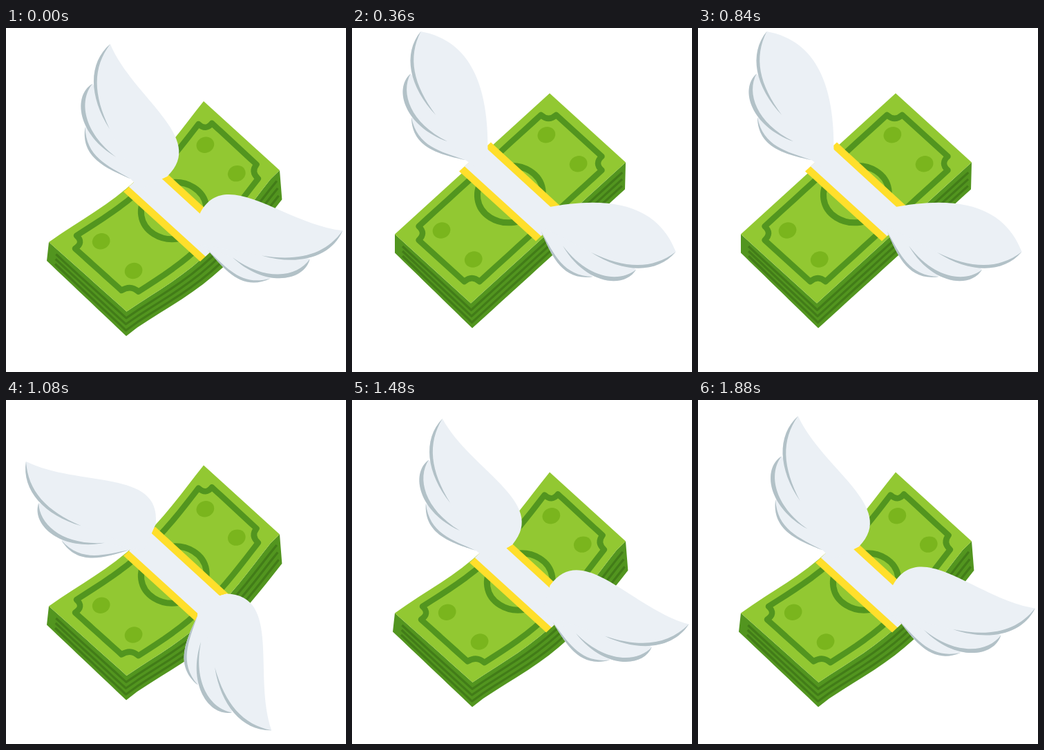
An HTML page with a canvas that plays this animation: 492x498 px, repeating every 1.92 s.

```html
<!DOCTYPE html>
<html lang="en">
<head>
<meta charset="utf-8">
<title>Flying money</title>
<style>
  html, body { margin: 0; width: 100%; height: 100%; overflow: hidden; background: #fff; }
  canvas { display: block; }
</style>
</head>
<body>
<canvas id="stage" width="492" height="498"></canvas>
<script>
const ctx = document.getElementById('stage').getContext('2d');
const LOOP = 1920, FLAP = 480, STEP = 40;
const GREEN = '#92c832', DARK = '#52951f', LINE = '#427c18', SPOT = '#7ab51d';
const WHITE = '#ebf0f5', SHADE = '#b2c1c7', YELLOW = '#ffdf2b';
const LEFT = [62, 298], LONG = [224, -204], SHORT = [110, 100];
const { sin, cos, PI, max } = Math;

const lerp = (a, b, k) => a.map((v, i) => v + (b[i] - v) * k);
const start = p => { ctx.beginPath(); ctx.moveTo(...p); };
const line = p => ctx.lineTo(...p);
const cubic = (a, b, p) => ctx.bezierCurveTo(...a, ...b, ...p);
const fill = color => { ctx.closePath(); ctx.fillStyle = color; ctx.fill(); };
function stroke(color, width) {
  ctx.strokeStyle = color;
  ctx.lineWidth = width;
  ctx.lineJoin = 'round';
  ctx.stroke();
}
function poly(color, ...pts) {
  start(pts[0]);
  pts.slice(1).forEach(line);
  fill(color);
}

// Place on the flat top face: u runs along the long side, v along the short one.
const face = (u, v) => LEFT.map((p, i) => p + LONG[i] * u + SHORT[i] * v);

function drawBill(bend) {
  // The sag is strongest halfway along the long side.
  function sag([x, y]) {
    const t = ((x - LEFT[0]) * LONG[0] + (y - LEFT[1]) * LONG[1]) / (LONG[0] ** 2 + LONG[1] ** 2);
    const w = max(0, 4 * t * (1 - t));
    return [x + 14 * w * bend, y + 12.5 * w * w * bend];
  }
  function edge(a, b) {
    for (let k = 0; k <= 16; k++) line(sag(lerp(a, b, k / 16)));
  }

  const left = LEFT, top = face(1, 0), right = face(1, 1), front = face(0, 1);
  const left2 = [62 - 3 * bend, 325], front2 = [174, 434], right2 = [395 + 2 * bend, 233 + 3 * bend];

  ctx.beginPath();
  edge(left, front);
  edge(front, right);
  edge(right2, front2);
  edge(front2, left2);
  fill(DARK);
  for (const k of [0.27, 0.52, 0.77]) {
    const l = lerp(left, left2, k), f = lerp(front, front2, k), r = lerp(right, right2, k);
    ctx.beginPath();
    edge(lerp(l, f, 0.1), f);
    edge(f, lerp(r, f, 0.02));
    stroke(LINE, 3.2);
  }

  ctx.beginPath();
  edge(left, top);
  edge(top, right);
  edge(right, front);
  edge(front, left);
  fill(GREEN);

  // Frame with a notch at each corner
  const corners = [[0, 0], [1, 0], [1, 1], [0, 1]].map(([cu, cv], i) => {
    const spot = (u, v) => face(cu ? 1 - u : u, cv ? 1 - v : v);
    const ends = [spot(0.056, 0.2), spot(0.105, 0.1)];
    if (i % 2) ends.reverse();
    return { from: ends[0], dip: spot(0.105, 0.2), to: ends[1] };
  });
  ctx.beginPath();
  corners.forEach((c, i) => {
    line(sag(c.from));
    ctx.quadraticCurveTo(...sag(c.dip), ...sag(c.to));
    edge(c.to, corners[(i + 1) % 4].from);
  });
  ctx.closePath();
  stroke(DARK, 8.5);

  const oval = (p, rx, ry, turn) => {
    ctx.beginPath();
    ctx.ellipse(...sag(p), rx, ry, turn, 0, PI * 2);
  };
  oval(face(0.514, 0.47), 47.5, 41, -0.15);
  stroke(DARK, 9);
  for (const u of [0.164, 0.842]) for (const v of [0.28, 0.7]) {
    oval(face(u, v), 13, 11.5, -0.35);
    fill(SPOT);
  }
}

function drawBand() {
  const a = [155, 207], b = [201, 165], c = [311, 266], d = [266, 308];
  poly(YELLOW, a, b, c, d);
  poly(WHITE, lerp(a, b, 0.17), lerp(a, b, 0.83), lerp(d, c, 0.83), lerp(d, c, 0.17));
}

// Wing in its own axes: x from the shoulder to the tip, y towards the leading edge.
function drawWing(pivot, angle, side, bulge, flex) {
  ctx.save();
  ctx.translate(...pivot);
  ctx.rotate(angle);
  ctx.scale(1, side);

  const root = [-8, 0], tip = [206, 0];
  const shoulder = [7 - 5 * bulge, 23 + 19 * bulge];
  const lead1 = [80 - 36 * bulge + 15 * flex, 59 + 51 * bulge + 2 * flex];
  const lead2 = [143 - 20 * bulge + 23 * flex, 12 + 4 * bulge + 50 * flex];
  const feathers = [
    [[96, -60], [54, -76], [31, -42], [9, -11]],
    [[155, -37], [144, -69], [87, -73], [44, -25]],
    [tip, [186, -37], [138, -46], [86, -26]]
  ];

  for (const [from, c1, c2, end] of feathers) {
    start(from);
    cubic(c1, c2, end);
    line(root);
    line(shoulder);
    if (from === tip) cubic(lead1, lead2, tip);
    fill(WHITE);
  }
  for (const [from, c1, c2, end] of feathers) {
    const mid = lerp(from, end, 0.5);
    start(from);
    cubic(c1, c2, end);
    cubic(lerp(c2, mid, 0.2), lerp(c1, mid, 0.2), from);
    fill(SHADE);
  }
  ctx.restore();
}

function draw(now) {
  const t = Math.floor((now % LOOP) / STEP) * STEP;
  const x = t / FLAP * 2 * PI;
  const supple = t < LOOP / 2;            // later the bill stays bent
  const bend = supple ? cos(x) : 1;
  const flex = supple ? -sin(x) : 0;
  const bulge = max(0, bend);
  const drop = 0.9 * (1 - cos(x + 0.63 * sin(x) ** 2)) / 2;

  ctx.setTransform(1, 0, 0, 1, 0, 0);
  ctx.fillStyle = '#fff';
  ctx.fillRect(0, 0, 492, 498);
  ctx.translate(0, 0.5 + 11.5 * cos(x));
  drawBill(bend);
  ctx.translate(15 * bend, 18 * bend);
  drawBand();
  drawWing([178, 195], -1.777 - drop, 1, bulge, flex);
  drawWing([267, 281], -0.086 + 1.59 * drop, -1, bulge, flex);
}

const begin = performance.now();
function tick() {
  draw(performance.now() - begin);
  requestAnimationFrame(tick);
}
tick();
</script>
</body>
</html>
```
